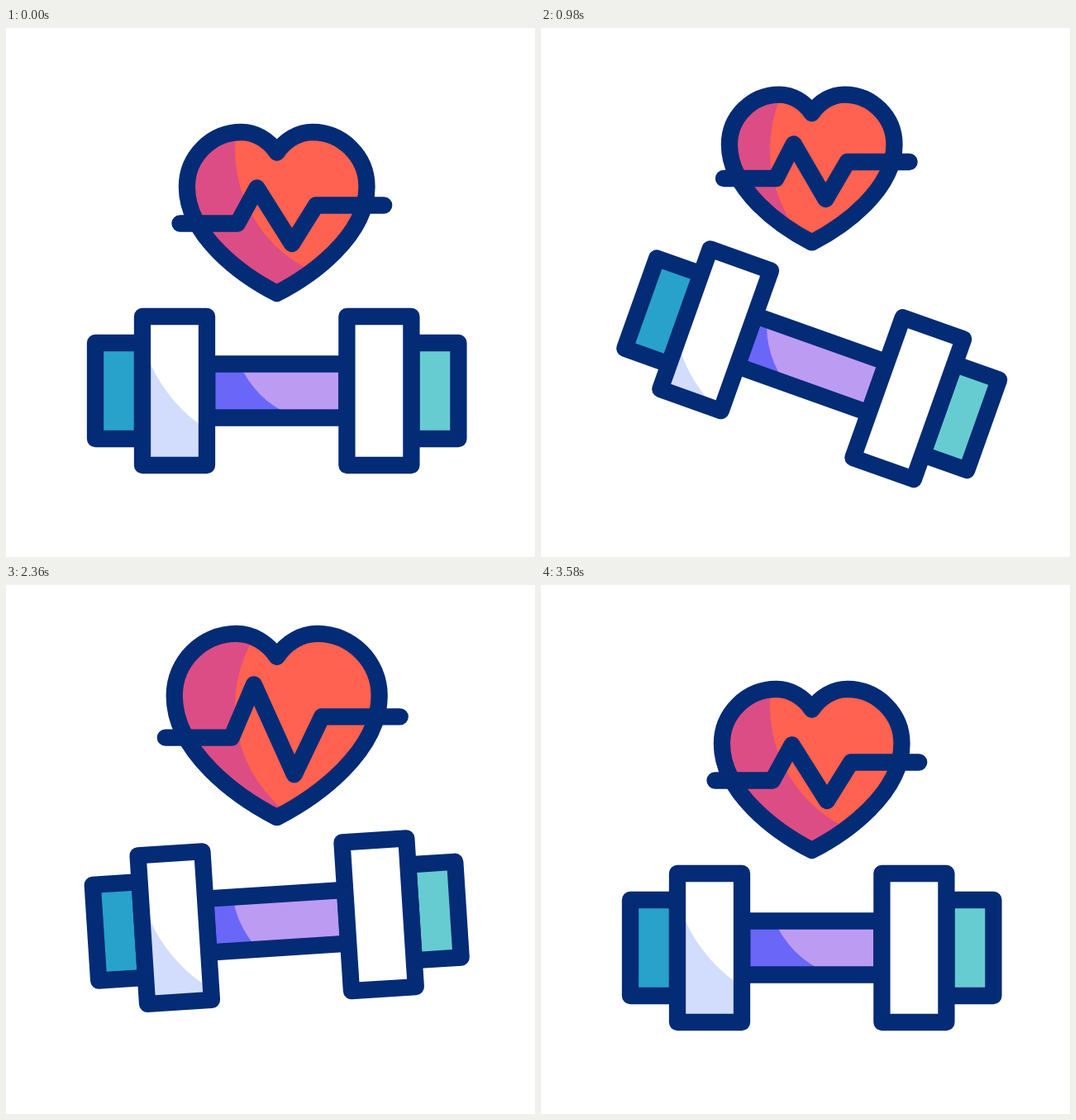
An HTML page with a canvas that plays this animation: 640x640 px, repeating every 3600 ms.

```html
<!DOCTYPE html>
<html lang="en">
<head>
<meta charset="utf-8">
<title>Dumbbell and heartbeat</title>
<style>
  html, body { margin: 0; width: 100%; height: 100%; overflow: hidden; background: #fff; }
  canvas { display: block; width: 640px; height: 640px; }
</style>
</head>
<body>
<canvas id="stage" width="640" height="640"></canvas>
<script>
const ctx = document.getElementById('stage').getContext('2d');
const LOOP = 3600, CX = 327.7, RAD = Math.PI / 180, TURN = 2 * Math.PI;
const NAVY = '#042b75', CORAL = '#ff6250';

const progress = (t, from, to) => Math.min(1, Math.max(0, (t - from) / (to - from)));
const ease = (t, from, to) => (1 - Math.cos(progress(t, from, to) * Math.PI)) / 2;
const wave = (t, peak, period) => Math.cos((t - peak) / period * TURN);

function poseAt(t) {
  const lift = ease(t, 120, 720), drop = ease(t, 2560, 3010), settle = ease(t, 3010, 3360);
  const move = (height, dip) => -height * lift + (height + dip) * drop - dip * settle;

  // The bar rocks up to 20 degrees and calms down; landing jolts bar and heart.
  const calm = Math.cos(progress(t, 567, 3580) * Math.PI / 2) ** 0.85;
  const swing = -20 * ease(t, 120, 567) * calm * wave(Math.max(t, 567), 567, 814);
  const landing = progress(t, 2560, 3580);
  const jolt = 5 * (1 - landing) * Math.sin(landing * TURN);

  // Every third heartbeat is a strong one.
  const active = ease(t, 120, 400) * (1 - ease(t, 2600, 2850));
  const strength = 0.135 + 0.1 * wave(t, 709, 1614);
  const beat = active * (strength * (1 + wave(t, 709, 538)) / 2 - 0.083);

  return {
    barY: 439 + move(32.3, 28),
    tilt: swing + jolt / 2,
    heartY: 223.5 + move(53.5, 25),
    heartTilt: jolt,
    heartSize: 1 + beat,
    lineSize: 1 + 1.08 * beat,
    spike: 1 - 0.4 * active * wave(t, 660, 1133),
    ringTail: 90 + 360 * ease(t, 565, 925),
    ringHead: 90 + 360 * ease(t, 460, 810)
  };
}

function rectPath(x, y, w, h) {
  const path = new Path2D();
  path.rect(x, y, w, h);
  return path;
}

function place(y, degrees) {
  ctx.translate(CX, y);
  ctx.rotate(degrees * RAD);
}

function outline(path, color = NAVY) {
  ctx.strokeStyle = color;
  ctx.stroke(path);
}

function paint(path, color) {
  ctx.fillStyle = color;
  ctx.fill(path);
  outline(path);
}

// The lit circle stays still on the stage while the shape moves under it.
function paintLit(path, shade, light, x, y, r) {
  ctx.fillStyle = shade;
  ctx.fill(path);
  ctx.save();
  ctx.clip(path);
  ctx.resetTransform();
  ctx.beginPath();
  ctx.arc(x, y, r, 0, TURN);
  ctx.fillStyle = light;
  ctx.fill();
  ctx.restore();
  outline(path);
}

const bar = rectPath(-84.5, -32.5, 169, 65);
const leftCap = rectPath(-219.7, -58, 57, 116);
const rightCap = rectPath(162.7, -58, 57, 116);
const leftPlate = rectPath(-162.7, -90, 78, 180);
const rightPlate = rectPath(84.7, -90, 78, 180);

function drawRing(pose, start, end) {
  const from = Math.max(pose.ringTail, start), to = Math.min(pose.ringHead, end);
  if (to <= from) return;
  const path = new Path2D();
  path.ellipse(0, 0, 25, 92, 0, from * RAD, to * RAD);
  outline(path, CORAL);
}

function drawDumbbell(pose) {
  ctx.save();
  place(pose.barY, pose.tilt);
  drawRing(pose, 270, 450);
  paintLit(bar, '#6a66f8', '#bc9bf3', 391, 360, 118);
  paint(leftCap, '#28a2cb');
  paint(rightCap, '#66ccd1');
  paintLit(leftPlate, '#d2ddfe', '#fff', 341, 332, 182);
  paint(rightPlate, '#fff');
  drawRing(pose, 90, 270);
  ctx.restore();
}

function heartPath(size) {
  const path = new Path2D();
  for (const side of [1, -1]) {
    const curve = (...p) => path.bezierCurveTo(...p.map((n, i) => n * size * (i % 2 ? 1 : side)));
    path.moveTo(0, -73 * size);
    curve(10, -88, 26, -97.5, 43, -97.5);
    curve(79, -97.5, 108.8, -68, 108.8, -31.5);
    curve(108.8, 28, 42, 76, 0, 97.5);
  }
  return path;
}

function pulsePath(size, spike) {
  const path = new Path2D();
  const add = (x, y) => path.lineTo(x * size, 2 + y * size);
  add(-117.2, 11);
  add(-47.7, 11);
  add(-24.2, -32 * spike);
  add(18.3, 35.5 * spike);
  add(47.3, -11);
  add(129.5, -11);
  return path;
}

function drawHeart(pose) {
  ctx.save();
  place(pose.heartY, pose.heartTilt);
  paintLit(heartPath(pose.heartSize), '#dc4d85', CORAL, 440, 147, 163);
  outline(pulsePath(pose.lineSize, pose.spike));
  ctx.restore();
}

function draw() {
  const pose = poseAt(performance.now() % LOOP);
  ctx.fillStyle = '#fff';
  ctx.fillRect(0, 0, 640, 640);
  ctx.lineWidth = 20.3;
  ctx.lineCap = ctx.lineJoin = 'round';
  drawDumbbell(pose);
  drawHeart(pose);
  requestAnimationFrame(draw);
}
draw();
</script>
</body>
</html>
```
